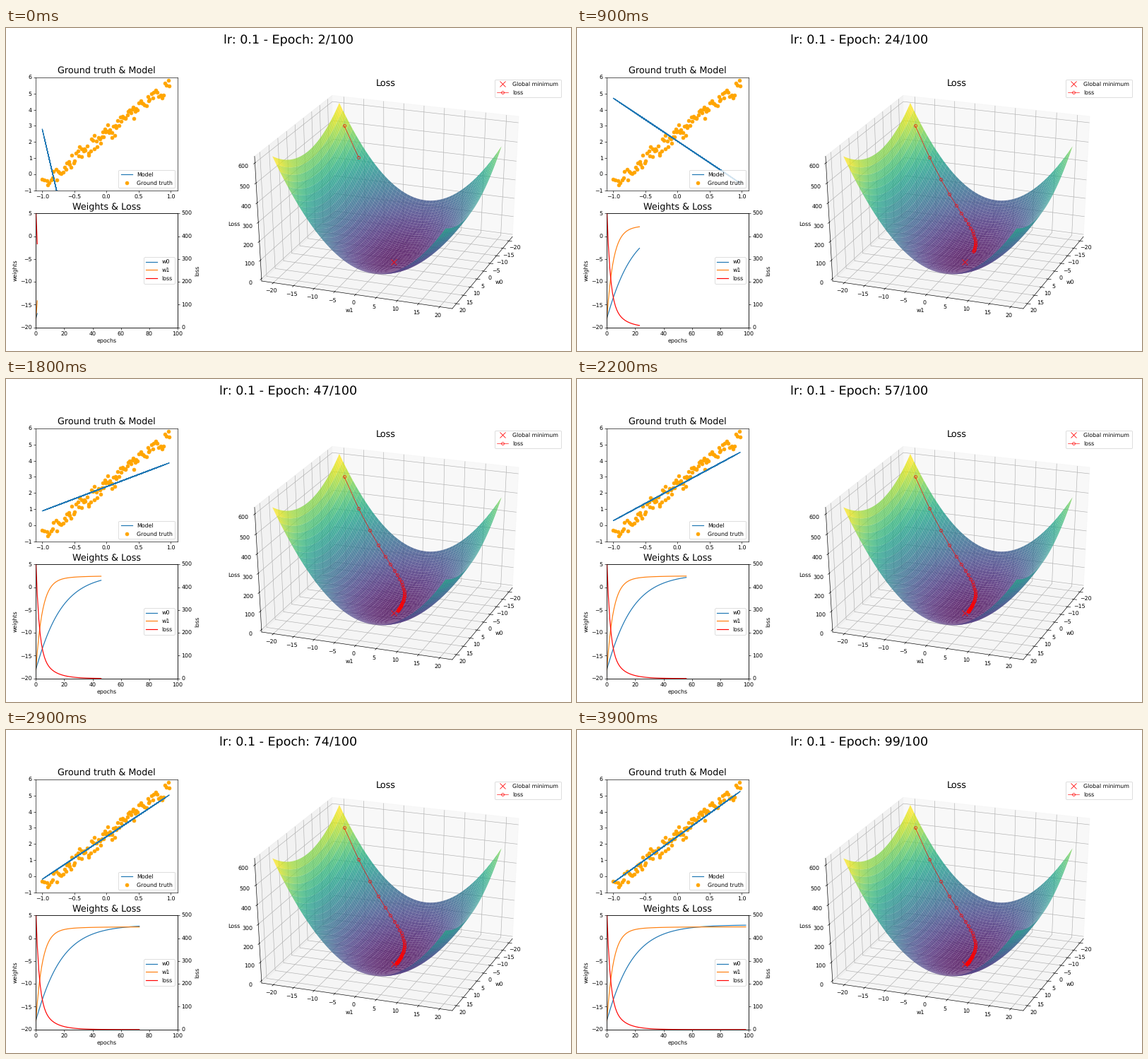
A matplotlib script that plays this animation: 800x457 px, repeating every 4 s.

```python
import numpy as np
import matplotlib.pyplot as plt
from matplotlib.animation import FuncAnimation

W, H = 800, 457
FRAMES, EPOCHS, RATE = 40, 100, 0.1

# Statistics of the fitted data: mean of x squared, mean of x, best weights, residual
XX, XM = 0.292, -0.038
BEST = np.array([2.9, 2.47])
NOISE = 0.083
HESSIAN = np.array([[XX, XM], [XM, 1.0]])

plt.rcParams["text.hinting"] = "none"


def loss_at(w0, w1):
    a, b = w0 - BEST[0], w1 - BEST[1]
    return XX * a * a + 2 * XM * a * b + b * b + NOISE


def descend():
    w = np.array([-18.0, -18.1])
    path = []
    for _ in range(EPOCHS):
        path.append(w)
        w = w - 2 * RATE * HESSIAN @ (w - BEST)
    return np.array(path).T


def make_samples(count=100):
    """Noisy points on a line, a little denser around the middle."""
    rng = np.random.default_rng(3)
    u = np.linspace(-1, 1, count) + rng.uniform(-0.01, 0.01, count)
    x = rng.permutation(u * (0.84 + 0.15 * u * u))
    return x, 3 * x + 2 + rng.random(count)


def rect(x0, top, x1, bottom):
    return [x0 / W, 1 - bottom / H, (x1 - x0) / W, (bottom - top) / H]


xs, ys = make_samples()
w0, w1 = descend()
losses = loss_at(w0, w1)
steps = np.arange(EPOCHS)

fig = plt.figure(figsize=(14.00438, 8), dpi=57.125, facecolor="white")
heading = fig.suptitle("", fontsize=22)

# Data and model
fit_ax = fig.add_axes(rect(42.3, 69.6, 242.9, 230.3))
fit_ax.set_title("Ground truth & Model", fontsize=16)
model, = fit_ax.plot([], [], label="Model")
fit_ax.scatter(xs, ys, color="orange", label="Ground truth")
fit_ax.set(xlim=(-1.1, 1.11), ylim=(-1, 6),
           xticks=np.arange(-1, 1.1, 0.5), yticks=range(-1, 7))
fit_ax.legend(loc="lower right")

# Weights and loss over the epochs
weight_ax = fig.add_axes(rect(42.3, 262.2, 242.9, 423.8))
weight_ax.set_title("Weights & Loss", fontsize=16)
weight_ax.set(xlim=(0, EPOCHS), ylim=(-20, 5), ylabel="weights")
weight_ax.set_xlabel("epochs", labelpad=1.5)
loss_ax = weight_ax.twinx()
loss_ax.set(ylim=(0, 500), ylabel="loss")
w0_line, = weight_ax.plot([], [], label="w0")
w1_line, = weight_ax.plot([], [], label="w1")
loss_line, = loss_ax.plot([], [], color="red", label="loss")
loss_ax.legend(handles=[w0_line, w1_line, loss_line], loc="center right")

# Loss surface, filling a wide axes box
surf_ax = fig.add_axes(rect(285.1, 68.6, 789.6, 423.8), projection="3d",
                       computed_zorder=False)
surf_ax.apply_aspect = lambda position=None: None
surf_ax.patch.set_visible(False)
surf_ax.set_title("Loss", fontsize=16, y=1.046, pad=0)
grid = np.linspace(-20, 20, 50)
gx, gy = np.meshgrid(grid, grid)
gz = loss_at(gx, gy)
surf_ax.plot_surface(gx, gy, gz, cmap="viridis", alpha=0.8, zorder=1)
surf_ax.plot([3], [2], [NOISE], "x", color="red", ms=11, mew=1,
             ls="none", label="Global minimum", zorder=5)
trail, = surf_ax.plot([], [], [], "o-", color="red", lw=0.8, ms=5, mew=0.8,
                      mfc="none", label="loss", zorder=6)
side = 22 * 25 / 24
margin = np.ptp(gz) / 48
surf_ax.set(xlim=(-side, side), ylim=(-side, side),
            zlim=(gz.min() - margin, gz.max() + margin),
            xticks=range(-20, 21, 5), yticks=range(-20, 21, 5),
            zticks=range(0, 601, 100), zlabel="Loss")
surf_ax.set_xlabel("w0", labelpad=2.5)
surf_ax.set_ylabel("w1", labelpad=2)
for name in "xy":
    surf_ax.tick_params(axis=name, pad=1)
surf_ax.set_box_aspect((1, 1, 1), zoom=0.94675)
surf_ax.view_init(elev=30, azim=20)
surf_ax.legend(loc="upper right")


def update(frame):
    n = (5 * frame + 4) // 2
    heading.set_text(f"lr: {RATE} - Epoch: {n}/{EPOCHS}")
    model.set_data(xs, w0[n - 1] * xs + w1[n - 1])
    for line, values in ((w0_line, w0), (w1_line, w1), (loss_line, losses)):
        line.set_data(steps[:n], values[:n])
    trail.set_data_3d(w0[:n], w1[:n], losses[:n])
    return heading, model, w0_line, w1_line, loss_line, trail


anim = FuncAnimation(fig, update, frames=FRAMES, interval=100,
                     repeat=True, repeat_delay=0, blit=False)
plt.show()
```
